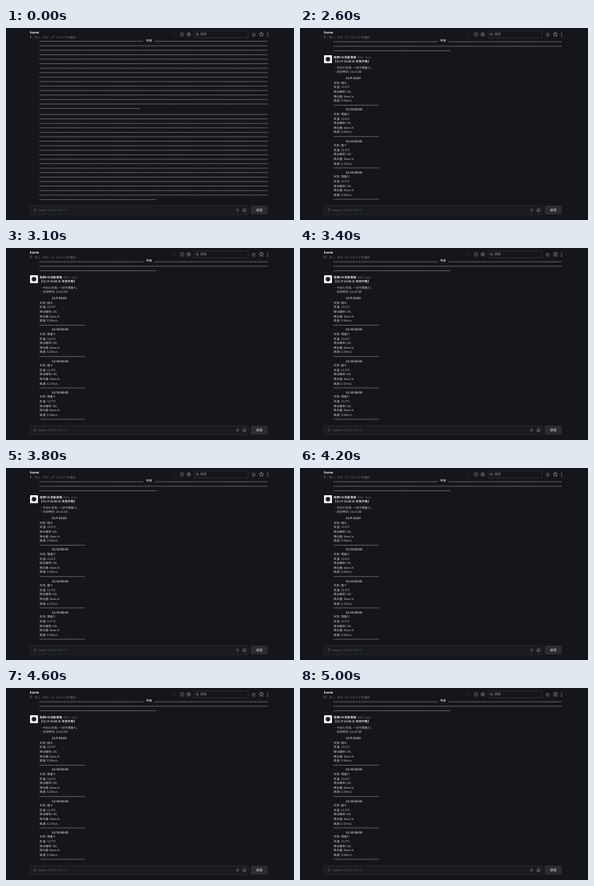
Animation of 360 by 240 pixels, one loop 5200 ms. Source, as an HTML page:

```html
<!DOCTYPE html>
<html lang="ja">
<head>
<meta charset="utf-8">
<title>Weather chat</title>
<style>
  html, body { margin: 0; width: 100%; height: 100%; overflow: hidden; background: #14161a; }
  svg { display: block; width: 360px; height: 240px; }
  text {
    font-family: Lato, "Noto Sans CJK JP", "Noto Sans CJK", sans-serif;
    text-rendering: geometricPrecision;
    white-space: pre;
  }
</style>
</head>
<body>
<svg id="stage" viewBox="0 0 360 240">
  <g id="before"></g>
  <g id="after"></g>
  <g id="chrome"></g>
</svg>
<script>
const LOOP = 5200, SWITCH = 2600;
const LEFT = 42, RIGHT = 327, STEP = 5.6;
const BG = '#14161a', TEXT = '#c9cacc', DIM = '#85878a', FAINT = '#65676b';
const before = document.getElementById('before');
const after = document.getElementById('after');
const chrome = document.getElementById('chrome');

function add(parent, tag, attrs, content) {
  const el = document.createElementNS('http://www.w3.org/2000/svg', tag);
  for (const key in attrs) el.setAttribute(key, attrs[key]);
  if (content) el.textContent = content;
  parent.append(el);
  return el;
}

function label(parent, x, y, content, size = 3.7, fill = TEXT, weight = 400, anchor = 'start') {
  add(parent, 'text', { x, y, fill, 'font-size': size, 'font-weight': weight, 'text-anchor': anchor }, content);
}

function box(parent, x, y, width, height, fill, stroke = 'none', rx = 1) {
  add(parent, 'rect', { x, y, width, height, rx, fill, stroke, 'stroke-width': 0.5 });
}

function icon(d, stroke = DIM, width = 0.6) {
  add(chrome, 'path', { d, stroke, fill: 'none', 'stroke-width': width, 'stroke-linecap': 'round', 'stroke-linejoin': 'round' });
}

function ring(cx, cy, r, stroke = DIM) {
  add(chrome, 'circle', { cx, cy, r, stroke, fill: 'none', 'stroke-width': 0.6 });
}

function dot(cx, cy, r, fill = DIM) {
  add(chrome, 'circle', { cx, cy, r, fill });
}

function rule(parent, y, end = RIGHT) {
  add(parent, 'path', {
    d: `M${LEFT} ${y}H${end}`, stroke: '#929395',
    'stroke-width': 0.8, 'stroke-dasharray': '1 .4'
  });
}

function rules(parent, y, count, lastEnd) {
  for (let i = 0; i < count; i++) rule(parent, y + i * STEP, i === count - 1 ? lastEnd : RIGHT);
}

// Long dashed messages
rules(before, 16.6, 16, 168);
rules(before, 108, 20, 188);

// Forecast message
rules(after, 17.2, 3, 188);
box(after, 30, 34, 10, 10, '#f2f2f2');
add(after, 'circle', { cx: 35, cy: 39, r: 2.8, fill: '#1b1d20' });
label(after, LEFT, 37.7, '青野MK気象情報', 3.7, '#dddedf', 700);
box(after, 71.2, 34.8, 8, 3.5, '#25272b', 'none', 0.5);
label(after, 75.2, 37.5, 'アプリ', 2.4, DIM, 400, 'middle');
label(after, 81, 37.6, '23:21', 3, DIM);
label(after, LEFT, 43.3, '【11/9 23:00 の 天気予報】', 3.7, '#dddedf', 700);
label(after, LEFT, 50.6, '・今日の天気: 一日中薄曇り。');
label(after, LEFT, 56.2, '・日没時刻: 16:41:00');

[
  ['11/9 23:00', '晴れ', '13.5', '3.98'],
  ['11/10 02:00', '薄曇り', '12.6', '4.28'],
  ['11/10 05:00', '曇り', '11.9', '4.17'],
  ['11/10 08:00', '薄曇り', '13.7', '5.98']
].forEach(([time, sky, temp, wind], n) => {
  const top = 64.2 + n * 7 * STEP;
  label(after, 57, top, time, 3.7, '#dddedf', 700);
  [`天気: ${sky}`, `気温: ${temp}℃`, '降水確率: 0%', '降水量: 0mm/h', `風速: ${wind}m/s`]
    .forEach((line, i) => label(after, LEFT, top + (i + 1) * STEP, line));
  rule(after, top + 6 * STEP - 1.3, 98.5);
});

// Header
label(chrome, 30, 7.3, 'hareo', 4.4, '#e6e6e7', 900);
icon('M31 9.8l.4 1 1 .1-.8.6.3 1-.9-.6-.9.6.3-1-.8-.6 1-.1z', DIM, 0.35);
label(chrome, 34, 12.6, '|', 3.2, FAINT);
dot(37.8, 10.7, 0.7);
icon('M36.7 12.4q1.1-1.5 2.2 0', DIM, 0.5);
label(chrome, 40.3, 12.6, '2', 3.2, DIM);
label(chrome, 44, 12.6, '|', 3.2, FAINT);
icon('M47.2 12.5l1-1m-.6-1.1l1.7 1.7m-1-1.8l1.2 1.1', DIM, 0.5);
label(chrome, 51, 12.6, '0', 3.2, DIM);
label(chrome, 54.7, 12.6, '|', 3.2, FAINT);
icon('M57.8 12.4l.3-.9 1.8-1.8.6.6-1.8 1.8z', DIM, 0.4);
label(chrome, 61.8, 12.6, 'トピックを追加', 3.6, DIM);

box(chrome, 171.5, 12.8, 14.5, 5.4, BG, 'none', 2.5);
label(chrome, 178.7, 16.6, '今日', 3.7, '#dddedf', 700, 'middle');

icon('M209 6.3q.4 2.8 3.2 3.5', '#3b3d41');
ring(220, 8, 2.3);
icon('M220 7.8v1.1M220 6.8v.1', DIM, 0.5);
ring(228.5, 8, 1.9);
ring(228.5, 8, 0.7);
add(chrome, 'circle', { cx: 228.5, cy: 8, r: 2.3, fill: 'none', stroke: DIM, 'stroke-width': 0.6, 'stroke-dasharray': '.9 .9' });
box(chrome, 235.3, 3.7, 67.2, 8.6, BG, '#44474b');
ring(239, 7.6, 1.2);
icon('M239.9 8.5l1 1');
label(chrome, 243, 9.3, '検索', 4, DIM);
label(chrome, 309.6, 9.9, '@', 5.6, '#a0a2a4', 400, 'middle');
icon('M319.3 5.2l.8 1.8 2 .2-1.5 1.3.5 2-1.8-1.1-1.8 1.1.5-2-1.5-1.3 2-.2z', '#a0a2a4');
[6, 8.1, 10.2].forEach(y => dot(327, y, 0.6, '#a0a2a4'));

// Composer
box(chrome, 29.8, 222.2, 273, 11, '#191b1f', '#383b3f');
icon('M37 226.7l-1.7 1.9q-.5.7.2 1t1-.4l1-1.3q.8-1.5-.4-2.1t-2 .7l-1 1.4', FAINT, 0.45);
label(chrome, 41, 229.2, 'hareo へのメッセージ', 3.8, FAINT);
label(chrome, 289.6, 229.3, '@', 4.8, DIM, 400, 'middle');
ring(298, 227.8, 2);
icon('M297.1 228.4q.9 1 1.8 0M297.3 227.2v.1M298.7 227.2v.1', DIM, 0.45);
box(chrome, 306, 222, 21.2, 11.3, '#2b2d31');
label(chrome, 316.6, 229.3, '送信', 4.1, '#aeb0b2', 700, 'middle');

function show(group, first, second) {
  group.animate([
    { opacity: first, easing: 'step-end' },
    { opacity: second, offset: SWITCH / LOOP, easing: 'step-end' },
    { opacity: second }
  ], { duration: LOOP, iterations: Infinity });
}
show(before, 1, 0);
show(after, 0, 1);
</script>
</body>
</html>
```
